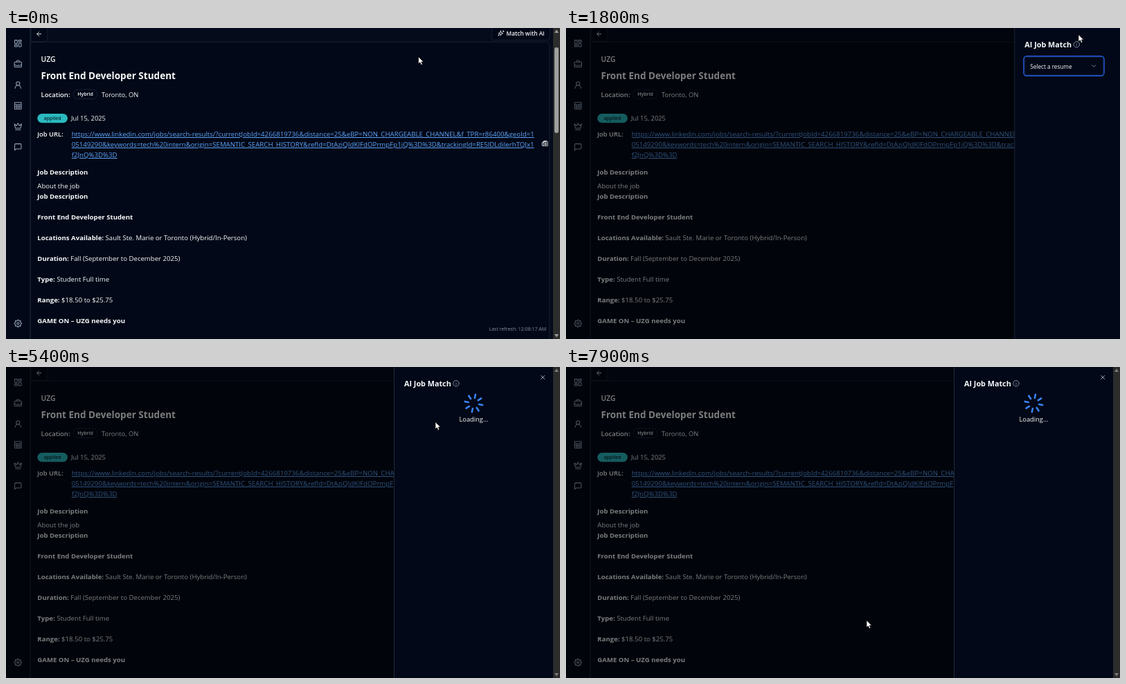
An HTML page for the animation above (8000 ms loop, 800x450 px).

```html
<!DOCTYPE html>
<html lang="en">
<head>
<meta charset="utf-8">
<title>AI Job Match</title>
<style>
  html, body { margin: 0; width: 100%; height: 100%; overflow: hidden; background: #020817; }
  svg { display: block; width: 800px; height: 450px; }
  text { font-family: "Open Sans", "Noto Sans", sans-serif; white-space: pre; }
  .icon { fill: none; stroke-linecap: round; stroke-linejoin: round; }
</style>
</head>
<body>
<svg id="stage" viewBox="0 0 800 450"></svg>
<script>
const NS = 'http://www.w3.org/2000/svg';
const LOOP = 8000;
const BG = '#020817', LINE = '#1e293b', TEXT = '#f8fafc', MUTED = '#94a3b8', BLUE = '#3b82f6';
const BODY = 9.62;
const stage = document.getElementById('stage');

function add(parent, tag, attrs, content) {
  const el = document.createElementNS(NS, tag);
  for (const k in attrs) el.setAttribute(k, attrs[k]);
  if (content) el.textContent = content;
  parent.appendChild(el);
  return el;
}
const group = (parent = stage) => add(parent, 'g', {});
const rect = (p, x, y, width, height, fill, more) =>
  add(p, 'rect', { x, y, width, height, fill, ...more });
const label = (p, x, y, size, str, weight = 400, fill = TEXT, more) =>
  add(p, 'text', { x, y, fill, 'font-size': size, 'font-weight': weight, ...more }, str);

// 24-unit line icon centred on x, y
function icon(p, x, y, scale, d, stroke = MUTED, width = 2) {
  return add(p, 'path', {
    class: 'icon', d, stroke, 'stroke-width': width,
    transform: `translate(${x} ${y}) scale(${scale}) translate(-12 -12)`
  });
}
function gear(teeth) {
  let d = '';
  for (let i = 0; i < teeth * 4; i++) {
    const a = (i - 0.5) / (teeth * 4) * 2 * Math.PI - Math.PI / 2;
    const r = i % 4 < 2 ? 10 : 7.6;
    d += (i ? 'L' : 'M') + (12 + r * Math.cos(a)).toFixed(2) + ' ' + (12 + r * Math.sin(a)).toFixed(2);
  }
  return d + 'zM15 12a3 3 0 1 1-6 0a3 3 0 1 1 6 0';
}
function spokes(count, inner, outer) {
  let d = '';
  for (let i = 0; i < count; i++) {
    const a = i / count * 2 * Math.PI, c = Math.cos(a), s = Math.sin(a);
    d += `M${12 + inner * c} ${12 + inner * s}L${12 + outer * c} ${12 + outer * s}`;
  }
  return d;
}

// Page
const page = group();
rect(page, 0, 0, 800, 450, BG);
rect(page, 35, 0, 765, 450, '#050b1b');
rect(page, 34.5, 0, 1, 450, LINE);
[
  [22.3, 'M3 3h7v9H3zM14 3h7v5h-7zM14 12h7v9h-7zM3 16h7v5H3z'],
  [52.3, 'M4 6h16a2 2 0 0 1 2 2v10a2 2 0 0 1-2 2H4a2 2 0 0 1-2-2V8a2 2 0 0 1 2-2zM16 6V4a2 2 0 0 0-2-2h-4a2 2 0 0 0-2 2v2M22 13a18 18 0 0 1-20 0M12 12h.01'],
  [82.5, 'M17 8a5 5 0 1 1-10 0a5 5 0 1 1 10 0M20 21a8 8 0 0 0-16 0'],
  [112.5, 'M3 3h18v18H3zM3 9h18M3 15h18M9 9v12M15 9v12'],
  [142.5, 'M2 5l3 12h14l3-12-6 5-4-7-4 7zM5 21h14'],
  [172.3, 'M21 15a2 2 0 0 1-2 2H7l-4 4V5a2 2 0 0 1 2-2h14a2 2 0 0 1 2 2z'],
  [427.5, gear(8)]
].forEach(([y, d]) => icon(page, 17.3, y, 0.52, d));

rect(page, 36, -6, 24, 25.5, BG, { stroke: LINE, 'stroke-width': 0.7, rx: 3 });
icon(page, 47.7, 8.7, 0.42, 'M19 12H5M12 19l-7-7 7-7', TEXT);
const matchBtn = rect(page, 701.5, -6, 84, 23.5, BG, { stroke: LINE, 'stroke-width': 0.7, rx: 3.5 });
icon(page, 714.8, 7.6, 0.42, 'M11 4l2 6 6 2-6 2-2 6-2-6-6-2 6-2zM20 3v4M22 5h-4M4 17v3M5.500 18.500h-3', TEXT);
label(page, 722.6, 11, 8.3, 'Match with AI', 600);

rect(page, 35.3, 20.3, 749.5, 440, BG, { stroke: LINE, 'stroke-width': 0.8, rx: 5 });
label(page, 50.5, 48.7, 10.4, 'UZG', 600);
label(page, 50.5, 74, 13.55, 'Front End Developer Student', 700);
label(page, 50.5, 99.5, 9.5, 'Location:', 600);
rect(page, 97, 89, 35, 13.500, 'none', { stroke: LINE, 'stroke-width': 0.8, rx: 6.7 });
label(page, 114.6, 98.4, 7, 'Hybrid', 600, TEXT, { 'text-anchor': 'middle' });
label(page, 138, 99.5, 9.4, 'Toronto, ON');
rect(page, 45.3, 124, 43.7, 13.2, '#2abac0', { rx: 6.6 });
label(page, 67.2, 133.1, 7, 'applied', 600, '#0b2530', { 'text-anchor': 'middle' });
label(page, 94, 134.4, 9.4, 'Jul 15, 2025');

label(page, 45.3, 157, 9.4, 'Job URL:', 600);
[
  'https://www.linkedin.com/jobs/search-results/?currentJobId=4266819736&distance=25&eBP=NON_CHARGEABLE_CHANNEL&f_TPR=r86400&geoId=1',
  '05149290&keywords=tech%20intern&origin=SEMANTIC_SEARCH_HISTORY&refId=DtAzjQIdKIFdOPrmpFp1jQ%3D%3D&trackingId=RE5lDLdiIerhTQJx1',
  'f2JnQ%3D%3D'
].forEach((s, i) => label(page, 94.7, 157 + i * 15, BODY + 0.07, s, 400, '#60a5fa', { 'text-decoration': 'underline' }));
icon(page, 778.2, 167.3, 0.4, 'M7 4h13a2 2 0 0 1 2 2v14H4a2 2 0 0 1-2-2V8h5zM7 4v14M11 2h6v4h-6zM11 11h7M11 15h7M14.500 11v5', TEXT);

[
  [212.3, 'Job Description', ''],
  [232.2, '', 'About the job'],
  [247.2, 'Job Description', ''],
  [277.2, 'Front End Developer Student', ''],
  [307.2, 'Locations Available:', ' Sault Ste. Marie or Toronto (Hybrid/In-Person)'],
  [337.2, 'Duration:', ' Fall (September to December 2025)'],
  [367.2, 'Type:', ' Student Full time'],
  [397.2, 'Range:', ' $18.50 to $25.75'],
  [427.2, 'GAME ON – UZG needs you', ''],
  [457, '', 'We are looking for a student who likes to build helpful tools and simple pages, and who will work with the team on the daily tasks of the website.']
].forEach(([y, bold, plain]) => {
  const row = label(page, 45.3, y, BODY, '');
  add(row, 'tspan', { 'font-weight': 700 }, bold);
  add(row, 'tspan', {}, plain);
});
const refresh = label(page, 780, 437.6, 7, 'Last refresh: 12:08:17 AM', 400, '#8490a3', { 'text-anchor': 'end' });

const shade = rect(stage, 0, 0, 800, 450, '#000');

// Side panel
const panel = group();
rect(panel, 560, 0, 240, 450, BG);
rect(panel, 560, 0, 1, 450, LINE);
label(panel, 575, 28.3, 10.8, 'AI Job Match', 700);
icon(panel, 650, 23.8, 0.42, 'M22 12a10 10 0 1 1-20 0a10 10 0 1 1 20 0M12 16v-4M12 8h.01', MUTED);
icon(panel, 775.2, 15, 0.42, 'M18 6L6 18M6 6l12 12', '#cbd5e1');

const select = group(panel);
rect(select, 573.7, 40.7, 116, 28.6, BG, { stroke: '#2563eb', 'stroke-width': 1.4, rx: 4.5 });
rect(select, 575.5, 42.5, 112.4, 25, 'none', { stroke: '#14213d', 'stroke-width': 0.7, rx: 3.5 });
label(select, 583, 58.7, 8.2, 'Select a resume');
icon(select, 675, 55, 0.42, 'M6 9l6 6 6-6', MUTED);

const loading = group(panel);
const spinner = icon(loading, 675.4, 52.5, 1.3, spokes(8, 6, 10), BLUE);
const spinBase = spinner.getAttribute('transform');
label(loading, 675.4, 79.3, 9.3, 'Loading...', 400, TEXT, { 'text-anchor': 'middle' });

// Scrollbar
const bar = group();
rect(bar, 790, 0, 10, 450, '#2c2c2c');
const arrows = add(bar, 'path', { d: 'M795 2.500l3 4.500h-6zM795 447.500l3-4.500h-6z' });
const thumb = rect(bar, 792, 28, 6, 124, '#9f9f9f', { rx: 3 });

const cursor = add(stage, 'path', {
  d: 'M0 0V10.300L2.400 8.200L4 11.900L5.900 11.100L4.300 7.500H7.500Z',
  fill: '#fff', stroke: '#000', 'stroke-width': 0.7, 'stroke-linejoin': 'round'
});

// time, x, y
const path = [
  [0, 595.5, 41.5], [1100, 740, 9.5], [1800, 740, 9.5], [2000, 739.3, 12], [2400, 739.3, 12],
  [3250, 570, 162.5], [3950, 570, 162.5], [4800, 620, 58], [5050, 620, 79.5],
  [5400, 620, 79.5], [6500, 434, 366.5], [LOOP, 434, 366.5]
];
const clamp = v => Math.min(1, Math.max(0, v));
const smooth = v => v * v * (3 - 2 * v);
const cubic = v => v < 0.5 ? 4 * v ** 3 : 1 - (2 - 2 * v) ** 3 / 2;
const show = (el, on) => el.setAttribute('visibility', on ? 'inherit' : 'hidden');

function pointer(t) {
  let i = 1;
  while (i < path.length - 1 && t >= path[i][0]) i++;
  const [t0, x0, y0] = path[i - 1], [t1, x1, y1] = path[i];
  const k = smooth(clamp((t - t0) / (t1 - t0)));
  return [x0 + (x1 - x0) * k, y0 + (y1 - y0) * k];
}

const OPEN = 1520, LOCK_END = 1900, LOAD = 5200;

function draw(t) {
  const [x, y] = pointer(t);
  cursor.setAttribute('transform', `translate(${x} ${y})`);
  matchBtn.setAttribute('fill', x > 701 && y < 18 ? '#151e31' : BG);

  const locked = t >= OPEN && t < LOCK_END;
  refresh.setAttribute('x', t >= OPEN ? 790 : 780);
  show(bar, !locked);
  show(thumb, t < OPEN);
  arrows.setAttribute('fill', t < OPEN ? '#9f9f9f' : '#7d7d7d');

  shade.setAttribute('opacity', 0.5 * clamp((t - OPEN) / 150));
  const slide = cubic(clamp((t - OPEN) / 500));
  const edge = locked ? 10 : 0;
  panel.setAttribute('transform', `translate(${edge + 230 * (1 - slide)} 0)`);
  show(panel, t >= OPEN);
  show(select, t < LOAD);
  show(loading, t >= LOAD);
  const turn = t * 0.36 + 2;
  spinner.setAttribute('transform', `${spinBase} rotate(${turn} 12 12)`);
}

const start = performance.now();
function tick() {
  draw((performance.now() - start) % LOOP);
  requestAnimationFrame(tick);
}
tick();
</script>
</body>
</html>
```
